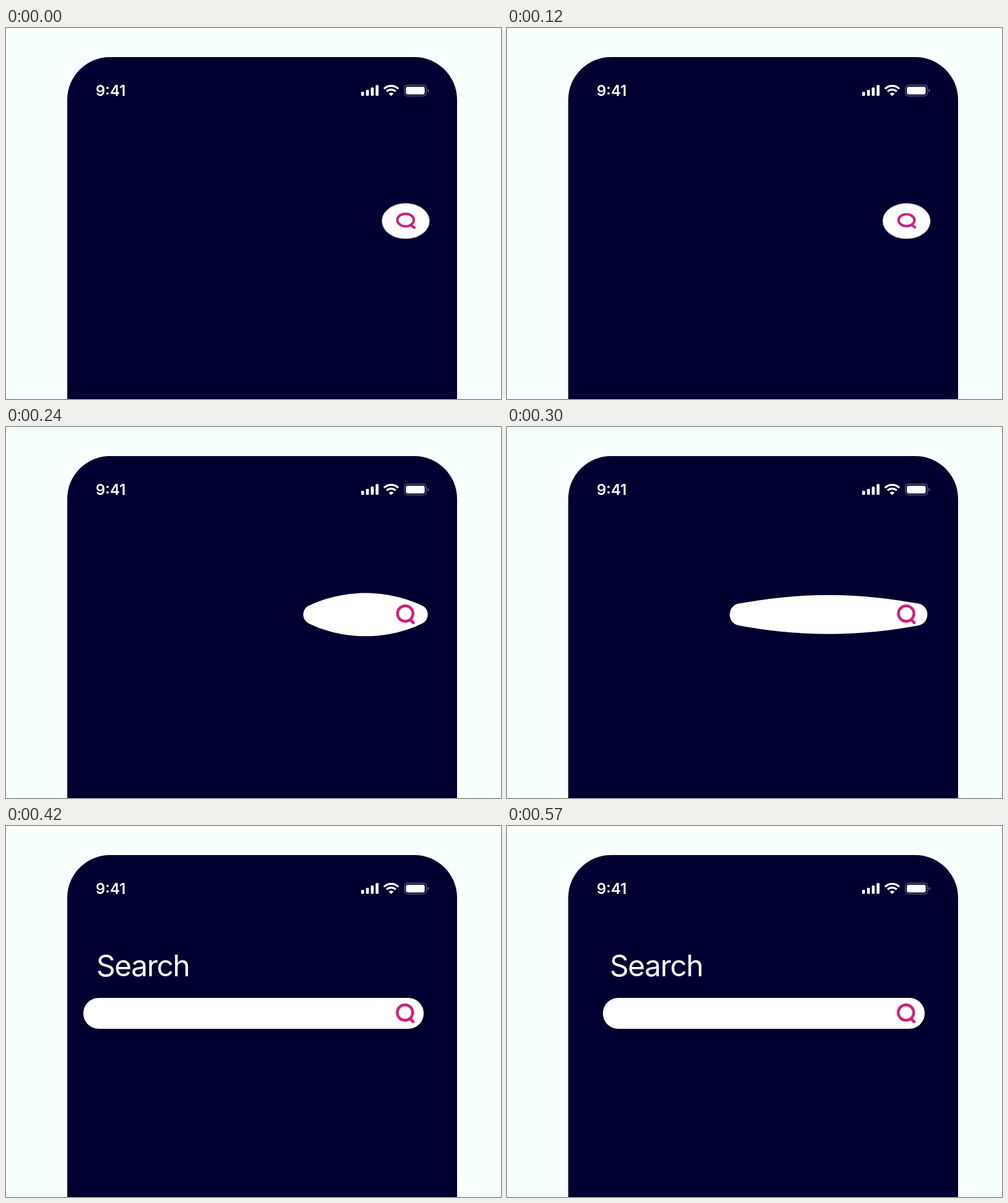
Recreate the animation shown at these times as an HTML page. Size 800 by 600 pixels, loop 0.9 s.

```html
<!DOCTYPE html>
<html lang="en">
<head>
<meta charset="utf-8">
<title>Search bar</title>
<style>
  html, body { margin: 0; width: 100%; height: 100%; overflow: hidden; background: #f7ffff; }
  svg { display: block; width: 800px; height: 600px; }
  text { font-family: Inter, "Open Sans", sans-serif; fill: #fff; }
  .clock { font-size: 24px; font-weight: 600; }
  .title { font-size: 48px; letter-spacing: -1.5px; }
  .lens { fill: none; stroke: #cc1f7c; stroke-linecap: round; }

  /* One 900 ms loop in 30 ms ticks: squash to 60, recover to 180,
     stretch to 420, settle by 510, then rest. */
  .field, .title, .icon, .ring, .handle {
    animation: 900ms linear -2ms infinite;
  }
  .field { animation-name: field; transform-origin: 646px 342px; }
  .title { animation-name: title; }
  .icon { animation-name: icon; }
  .ring { animation-name: ring; }
  .handle { animation-name: handle; }

  @keyframes field {
    0% { transform: translate(.5px, -1px) scaleY(.747); animation-timing-function: steps(2); }
    6.6667% { transform: translate(.5px, -2px) scaleY(.4935); animation-timing-function: steps(4); }
    0%, 20% {
      d: path("M645.5 265 c17.6 0 33 11.9 37.3 29 c.8 3.1 1.2 6.3 1.2 9.5 c0 3.2 -.4 6.4 -1.2 9.5 c-4.3 17.1 -19.7 29 -37.3 29 c-17.6 0 -33 -11.9 -37.3 -29 c-.8 -3.1 -1.2 -6.3 -1.2 -9.5 c0 -3.2 .4 -6.4 1.2 -9.5 c4.3 -17.1 19.7 -29 37.3 -29 Z");
    }
    20% { transform: translate(0px, 0px) scaleY(1); animation-timing-function: steps(8); }
    46.6667% {
      d: path("M400 278 c83 0 167 0 250 0 c13.8 0 25 11.2 25 25 c0 13.8 -11.2 25 -25 25 c-83 0 -167 0 -250 0 c-83 0 -167 0 -250 0 c-13.8 0 -25 -11.2 -25 -25 c0 -13.8 11.2 -25 25 -25 c83 0 167 0 250 0 Z");
      animation-timing-function: steps(3);
    }
    56.6667%, 100% {
      d: path("M415 278 c78 0 157 0 235 0 c13.8 0 25 11.2 25 25 c0 13.8 -11.2 25 -25 25 c-78 0 -157 0 -235 0 c-78 0 -157 0 -235 0 c-13.8 0 -25 -11.2 -25 -25 c0 -13.8 11.2 -25 25 -25 c78 0 157 0 235 0 Z");
    }
    100% { transform: translate(0px, 0px) scaleY(1); }
  }
  @keyframes title {
    0% { opacity: 0; transform: translateX(-20px); animation-timing-function: step-end; }
    46.6667% { opacity: 1; transform: translateX(-20px); animation-timing-function: steps(3); }
    56.6667%, 100% { opacity: 1; transform: none; }
  }
  @keyframes icon {
    0%, 20% { transform: translateX(0); animation-timing-function: steps(8); }
    46.6667%, 100% { transform: translateX(-.6px); }
  }
  @keyframes ring {
    0% { cx: 645.8px; cy: 310.6px; rx: 13.4px; ry: 10.1px; stroke-width: 4px; animation-timing-function: steps(2); }
    6.6667% { cx: 646px; cy: 319.9px; rx: 13.3px; ry: 6.7px; stroke-width: 3.6px; animation-timing-function: steps(4); }
    20%, 100% { cx: 645.4px; cy: 301.7px; rx: 12.5px; ry: 12.5px; stroke-width: 4.5px; }
  }
  @keyframes handle {
    0% { d: path("M654.5 319 L660 323"); stroke-width: 4.2px; animation-timing-function: steps(2); }
    6.6667% { d: path("M655 326 L660.4 328.2"); stroke-width: 3.5px; animation-timing-function: steps(4); }
    20%, 100% { d: path("M653.8 311.6 L658.5 316.6"); stroke-width: 4.6px; }
  }
</style>
</head>
<body>
<svg viewBox="0 0 800 600">
  <rect x="99" y="47" width="630" height="700" rx="69" fill="#000030"/>

  <text class="clock" x="145" y="110">9:41</text>
  <g fill="#fff">
    <rect x="574" y="103.3" width="4.7" height="6.4" rx="1.4"/>
    <rect x="581.8" y="100" width="4.7" height="9.7" rx="1.4"/>
    <rect x="589.6" y="96.3" width="4.7" height="13.4" rx="1.4"/>
    <rect x="597.4" y="92.3" width="4.7" height="17.4" rx="1.4"/>
    <path d="M622.5 110 l-3.9 -3.8 a5.5 5.5 0 0 1 7.8 0 Z"/>
    <rect x="646.3" y="95" width="30.4" height="12.4" rx="2.8"/>
    <path d="M681.4 98.2 a3.2 3.2 0 0 1 0 6 Z" opacity=".4"/>
  </g>
  <g fill="none" stroke="#fff">
    <path d="M610.9 98.4 a16.4 16.4 0 0 1 23.2 0 M615.2 102.7 a10.3 10.3 0 0 1 14.6 0" stroke-width="3.2"/>
    <rect x="643.9" y="92.5" width="35.5" height="17.3" rx="4.8" stroke-width="1.3" opacity=".38"/>
  </g>

  <text class="title" x="166" y="243">Search</text>
  <path class="field" fill="#fff"/>
  <g class="icon">
    <ellipse class="lens ring"/>
    <path class="lens handle"/>
  </g>
</svg>
</body>
</html>
```
